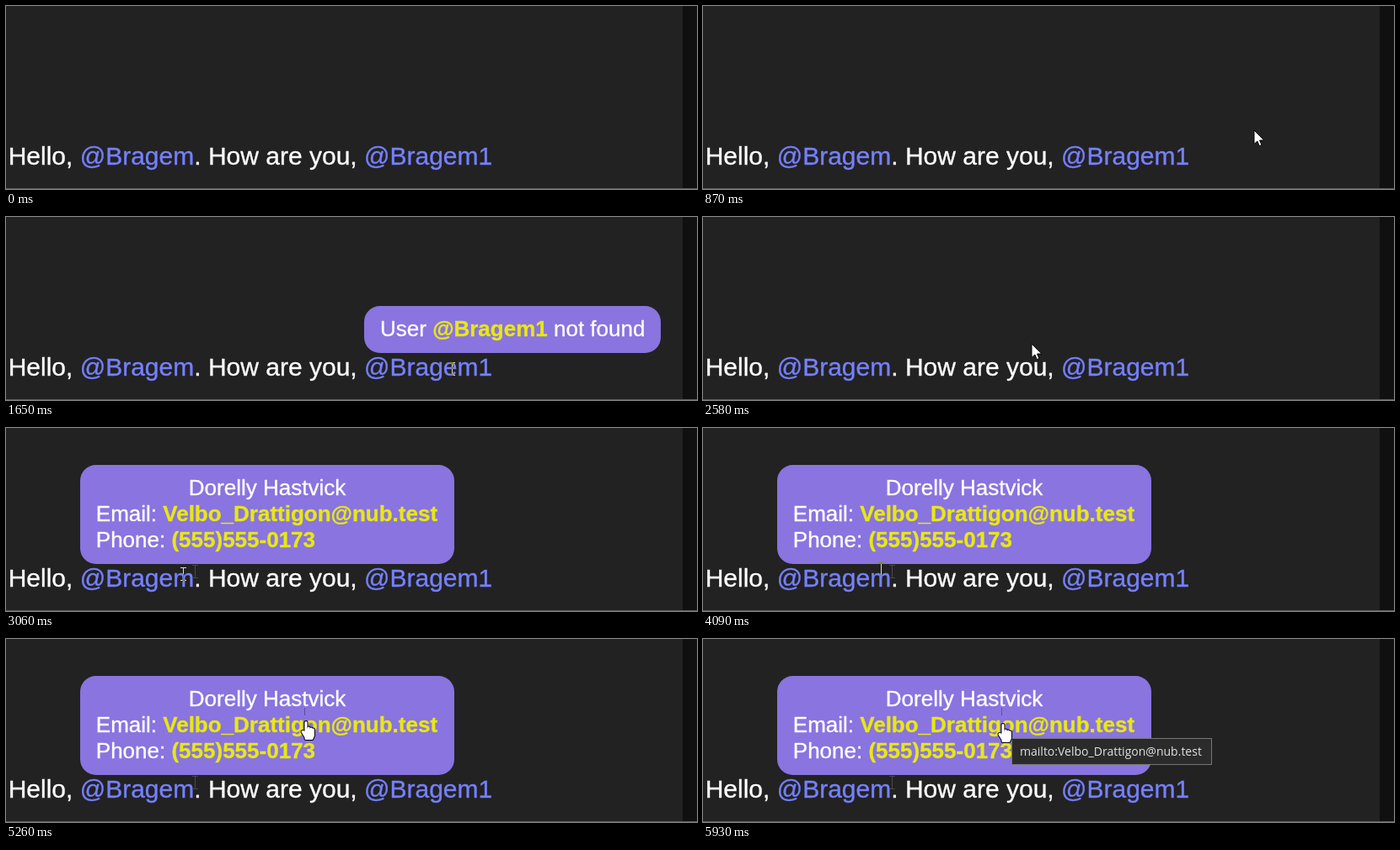
Recreate the animation shown at these times as an HTML page. Size 820 px wide and 218 px high, loop 8000 ms.

```html
<!DOCTYPE html>
<html lang="en">
<head>
<meta charset="utf-8">
<title>Mention tooltips</title>
<style>
  html, body { margin: 0; width: 100%; height: 100%; overflow: hidden; background: #222; }
  svg { display: block; }
  text {
    font-family: "Liberation Sans", Arial, sans-serif; white-space: pre;
    color: #fff; fill: currentColor; stroke: currentColor; stroke-width: .35px;
  }
  tspan { fill: currentColor; stroke: currentColor; }
  .message { font-size: 30px; }
  .message tspan { color: #7680ff; }
  .card text { font-size: 26px; }
  .card rect { fill: #8974e0; }
  .card tspan { color: #e8e813; font-weight: bold; }
  #hint text { font: 14px "Open Sans", "Noto Sans", sans-serif; color: #e2e2e2; stroke: none; }
  #arrow { fill: #fff; stroke: #000; stroke-linejoin: round; }
  #hand { fill: #fff; stroke-linecap: round; stroke-linejoin: round; }
  #beam { fill: none; stroke: #fff; mix-blend-mode: difference; }
  .trace { fill: none; stroke: #484848; }
</style>
</head>
<body>
<svg width="820" height="218" viewBox="0 0 820 218">
  <defs>
    <path id="caret" d="M-3 -7.5H4M.5 -7.5V7.5M-3 7.5H4"/>
    <path id="palm" d="M0 2.5V12M3.2 9V12M6.2 10V12M8.5 11V12M-4 13.5L0 20V21.5H7L8.5 18V12H0V15Z"/>
  </defs>
  <rect width="820" height="218" fill="#222"/>
  <rect x="803" width="17" height="218" fill="#101010"/>
  <rect y="217" width="820" height="1" fill="#5c5c5c"/>

  <text class="message" x="2.7" y="189">Hello, <tspan>@Bragem</tspan>. How are you, <tspan>@Bragem1</tspan></text>

  <g id="missing" class="card">
    <rect x="425" y="106" width="352" height="56" rx="18.75"/>
    <text x="444" y="142">User <tspan>@Bragem1</tspan> not found</text>
  </g>

  <g id="contact" class="card">
    <rect x="88" y="44" width="444" height="118" rx="18.75"/>
    <text x="310" y="80" text-anchor="middle">Dorelly Hastvick</text>
    <text x="106.8" y="111">Email: <tspan>Velbo_Drattigon@nub.test</tspan></text>
    <text x="106.8" y="142">Phone: <tspan>(555)555-0173</tspan></text>
  </g>

  <use id="messageTrace" class="trace" href="#caret" x="224" y="171"/>
  <path id="cardTrace" d="M354.5 82V91" stroke="#5d4f98"/>

  <g id="hint">
    <rect x="366.5" y="118.5" width="237" height="31" fill="#2b2b2b" stroke="#777"/>
    <text x="376" y="139">mailto:Velbo_Drattigon@nub.test</text>
  </g>

  <path id="arrow" d="M0 0V16.5L3.8 13L6.3 18.7L9 17.5L6.5 12H11.8Z"/>
  <g id="hand">
    <use href="#palm" stroke="#000" stroke-width="5"/>
    <use href="#palm" stroke="#fff" stroke-width="3"/>
  </g>
  <use id="beam" href="#caret"/>
</svg>
<script>
const LOOP = 8000;
const STEP = 70;
const TEXT_TOP = 162;

const linear = k => k;
const easeOut = k => k * (2 - k);

// Each move continues from where the previous one ended; lift bends it upwards.
const entry = { x: 738, y: 207 };
const moves = [
  { from: 450, to: 1290, x: 569, y: 180, lift: 46 },
  { from: 1290, to: 1650, x: 529, y: 181 },
  { from: 2310, to: 2580, x: 390, y: 151 },
  { from: 2580, to: 2920, x: 224, y: 171, lift: 8 },
  { from: 2920, to: 3350, x: 199, y: 177, ease: easeOut },
  { from: 4020, to: 4640, x: 309, y: 100 },
  { from: 4640, to: 4920, x: 353, y: 82, ease: easeOut },
  { from: 5050, to: 5400, x: 356, y: 100, ease: easeOut }
];

const el = id => document.getElementById(id);
const cursors = ["arrow", "hand", "beam"].map(el);
const clamp = k => Math.min(1, Math.max(0, k));
const ramp = (t, from, to) => clamp((t - from) / (to - from));
const show = (node, on) => { node.style.display = on ? "" : "none"; };

// Progress in whole pointer samples, about one per STEP.
function sampled(t, { from, to }) {
  const count = Math.round((to - from) / STEP);
  return clamp(Math.floor(ramp(t, from, to) * count + 0.1) / count);
}

function pointerAt(t) {
  const i = moves.findLastIndex(m => m.from <= t);
  if (i < 0) return null;
  const start = moves[i - 1] || entry;
  const { x, y, lift = 0, ease = linear } = moves[i];
  const k = ease(sampled(t, moves[i]));
  return [
    Math.round(start.x + (x - start.x) * k),
    Math.round(start.y + (y - start.y) * k - lift * 4 * k * (1 - k))
  ];
}

function cursorKind(x, y, cardOpen) {
  if (y > TEXT_TOP) return x < 577 ? "beam" : "arrow";
  if (!cardOpen || y > 149) return "arrow";
  return y < 87 ? "beam" : "hand";
}

function render(t) {
  el("missing").style.opacity = ramp(t, 1220, 1360) - ramp(t, 2440, 2570);
  el("contact").style.opacity = ramp(t, 2930, 3055);
  show(el("messageTrace"), t >= 2990);
  show(el("cardTrace"), t >= 5180);
  show(el("hint"), t >= 5930);

  const pos = pointerAt(t);
  const kind = pos && cursorKind(...pos, t > 3000);
  for (const cursor of cursors) {
    show(cursor, cursor.id === kind);
    if (pos) cursor.setAttribute("transform", `translate(${pos})`);
  }
}

const origin = performance.now();
function tick() {
  render((performance.now() - origin) % LOOP);
  requestAnimationFrame(tick);
}
render(0);
requestAnimationFrame(tick);
</script>
</body>
</html>
```
